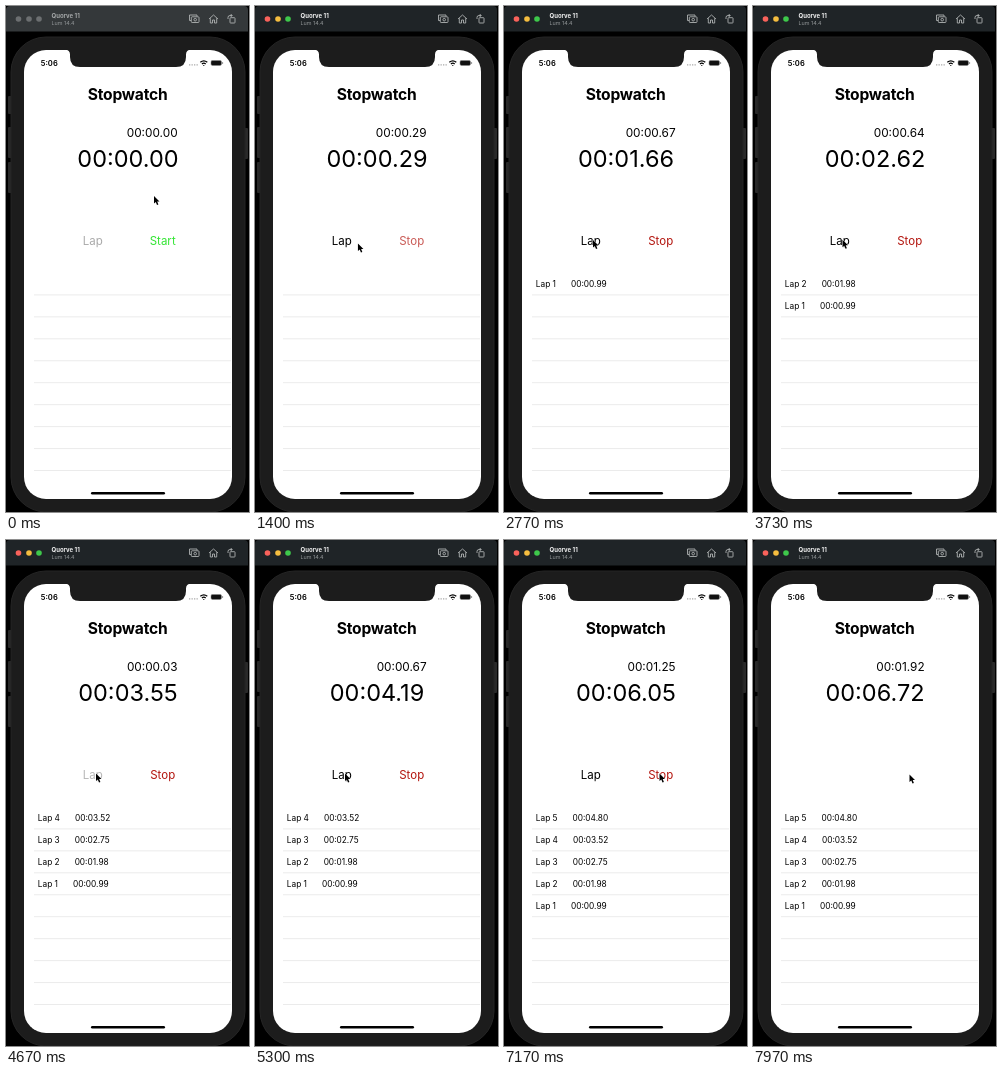
Recreate the animation shown at these times as an HTML page. Size 243x506 px, loop 8 s.

```html
<!DOCTYPE html>
<html lang="en">
<head>
<meta charset="utf-8">
<title>Stopwatch</title>
<style>
  html, body { margin: 0; width: 100%; height: 100%; overflow: hidden; background: #000; }
  svg { display: block; width: 100%; height: 100%; font-family: Inter, "Liberation Sans", sans-serif; }
  .mid { text-anchor: middle; }
  .button { font-size: 11.5px; text-anchor: middle; }
  .icon { fill: none; stroke: #aeb1b2; stroke-width: .9; stroke-linejoin: round; }
</style>
</head>
<body>
<svg viewBox="0 0 243 506">
  <rect width="243" height="506" fill="#000"/>

  <path id="bar" d="M0 25.5V4q0-4 4-4H238q4 0 4 4V25.5Z"/>
  <g id="lights"></g>
  <text id="device" x="45.5" y="12" font-size="6" font-weight="700">Quorve 11</text>
  <text x="45.5" y="19" font-size="5.4" fill="#94989a">Lum 14.4</text>
  <g class="icon">
    <path d="M185 14.5h-1.5v-5.5h7.500v1.500"/>
    <rect x="185.300" y="10.800" width="7.700" height="5.700" rx=".8"/>
    <circle cx="189.200" cy="13.700" r="1.300"/>
    <path d="M203 13l4.500-4 4.500 4M204.300 12.200v4.800h2.200v-3h2v3h2.200v-4.800"/>
    <rect x="224" y="11.700" width="5" height="5.300" rx=".6"/>
    <path d="M222 13v-1.500q0-2 2-2h2M224.700 8l1.500 1.500-1.500 1.500"/>
  </g>

  <g fill="#292929">
    <rect x="2" y="90" width="5" height="18" rx="1"/>
    <rect x="2" y="121" width="5" height="31" rx="1"/>
    <rect x="2" y="156" width="5" height="31" rx="1"/>
    <rect x="237" y="122" width="5" height="31" rx="1"/>
  </g>
  <rect x="5" y="31" width="234" height="475" rx="35" fill="#1c1c1c" stroke="#252525"/>
  <rect x="18" y="44" width="208" height="449" rx="22" fill="#fff"/>
  <path d="M59 43.500q5 .5 5 5v2.500q0 10 10 10H170q10 0 10-10v-2.500q0-4.500 5-5Z" fill="#1c1c1c"/>

  <text x="34.800" y="59.800" font-size="7.600" font-weight="600">5:06</text>
  <path d="M183 58.800h9" stroke="#aaa" stroke-width="1.300" stroke-dasharray="1.300 1.200"/>
  <g fill="none" stroke="#000" stroke-width="1.200">
    <path d="M194.300 56.300q3.500-3 7 0M195.900 58q1.900-1.600 3.800 0"/>
    <path d="M197.300 59.500h1"/>
  </g>
  <rect x="205" y="54.500" width="10.500" height="5" rx="1.400" fill="#111" stroke="#888" stroke-width=".5"/>
  <path d="M216.600 56v2" stroke="#777" stroke-width=".8"/>

  <text class="mid" x="121.600" y="94" font-size="15.600" font-weight="700" letter-spacing="-.2">Stopwatch</text>
  <text id="split" x="171.600" y="130.700" font-size="11.800" text-anchor="end"></text>
  <text id="total" class="mid" x="122" y="161.400" font-size="23.500"></text>
  <text id="lap" class="button" x="86.700" y="239">Lap</text>
  <text id="toggle" class="button" x="156.700" y="239"></text>
  <g id="lines" stroke="#e6e6e6" stroke-width=".8"></g>
  <g id="rows" font-size="8.300"></g>

  <rect x="85" y="486" width="74" height="2.600" rx="1.300"/>
  <path id="cursor" d="M0 0V7.600L1.800 6 3 9 4.400 8.400 3.200 5.600H5.500Z" fill="#000" stroke="#fff" stroke-width=".8" paint-order="stroke"/>
</svg>
<script>
const LOOP = 8000, ACTIVE = 900, START = 1110, STOP = 7830, HIDE = 7970;
const ROW = 21.95;
const laps = [99, 198, 275, 352, 480];

// Tracks: [time, ...values]
const clock = [[START, 0], [1400, 29], [2770, 166], [4670, 355], [6000, 490], [7170, 605], [STOP, 672]];
const pointer = [
  [70, 148, 190], [350, 154, 222], [630, 157, 236], [1150, 157, 236], [1400, 103, 237.5],
  [1600, 89, 234], [2770, 89, 234], [4670, 90, 233.500], [5930, 90, 233.500], [6000, 94, 233.500],
  [6450, 154, 234], [7170, 155.500, 233.500], [7600, 156.500, 234.500]
];

const $ = id => document.getElementById(id);
const clamp = v => Math.max(0, Math.min(1, v));
const pad = n => String(n).padStart(2, "0");
const format = cs => `${pad(Math.floor(cs / 6000))}:${pad(Math.floor(cs / 100) % 60)}.${pad(cs % 100)}`;

function sample(track, t) {
  const next = track.findIndex(key => key[0] > t);
  if (next === 0) return track[0].slice(1);
  if (next < 0) return track[track.length - 1].slice(1);
  const [a, b] = [track[next - 1], track[next]];
  const p = (t - a[0]) / (b[0] - a[0]);
  return a.slice(1).map((v, i) => v + (b[i + 1] - v) * p);
}

// Moment at which the clock reaches a given count
function timeAt(cs) {
  const i = clock.findIndex(key => key[1] >= cs);
  const [a, b] = [clock[i - 1], clock[i]];
  return a[0] + (cs - a[1]) / (b[1] - a[1]) * (b[0] - a[0]);
}
const lapTimes = laps.map(timeAt);

// Dim on press, fade back after release
function pressed(t, release) {
  if (t < release - 80) return 1;
  return 0.2 + 0.8 * clamp((t - release) / 300);
}

$("lights").innerHTML = [12.5, 23, 33].map(x => `<circle cx="${x}" cy="13" r="2.800"/>`).join("");
$("lines").innerHTML = Array.from({ length: 9 }, (_, i) =>
  `<path d="M28 ${288.900 + i * ROW}H225"/>`).join("");
$("rows").innerHTML = laps.map((cs, i) =>
  `<text x="31.800">Lap ${i + 1}<tspan dx="15">${format(cs)}</tspan></text>`).join("");

function render(t) {
  const active = t >= ACTIVE, running = t >= START;
  $("bar").setAttribute("fill", active ? "#1f2427" : "#34383a");
  $("device").setAttribute("fill", active ? "#f2f2f2" : "#a5a8a9");
  [...$("lights").children].forEach((dot, i) =>
    dot.setAttribute("fill", active ? ["#f9625b", "#f5bd3f", "#3ec84b"][i] : "#6c6f71"));

  const count = Math.round(sample(clock, t)[0]);
  const done = lapTimes.filter(time => time <= t + 0.01).length;
  $("total").textContent = format(count);
  $("split").textContent = format(Math.max(0, count - (done ? laps[done - 1] : 0)));

  [...$("rows").children].forEach((row, i) => {
    row.setAttribute("visibility", i < done ? "visible" : "hidden");
    row.setAttribute("y", 280.800 + (done - 1 - i) * ROW);
  });

  const shown = t < HIDE;
  $("lap").setAttribute("fill", running ? "#000" : "#aaa");
  $("lap").setAttribute("opacity", shown ? Math.min(...lapTimes.map(time => pressed(t, time))) : 0);
  $("toggle").textContent = running ? "Stop" : "Start";
  $("toggle").setAttribute("fill", running ? "#b3160f" : "#35e535");
  const fade = t < 1700 ? (t < 1040 ? 1 : 0.2 + 0.8 * clamp((t - 1200) / 320)) : t < 7800 ? 1 : 0.2;
  $("toggle").setAttribute("opacity", shown ? fade : 0);

  $("cursor").setAttribute("transform", `translate(${sample(pointer, t).join(" ")})`);
}

function tick() {
  render(performance.now() % LOOP);
  requestAnimationFrame(tick);
}
tick();
</script>
</body>
</html>
```
